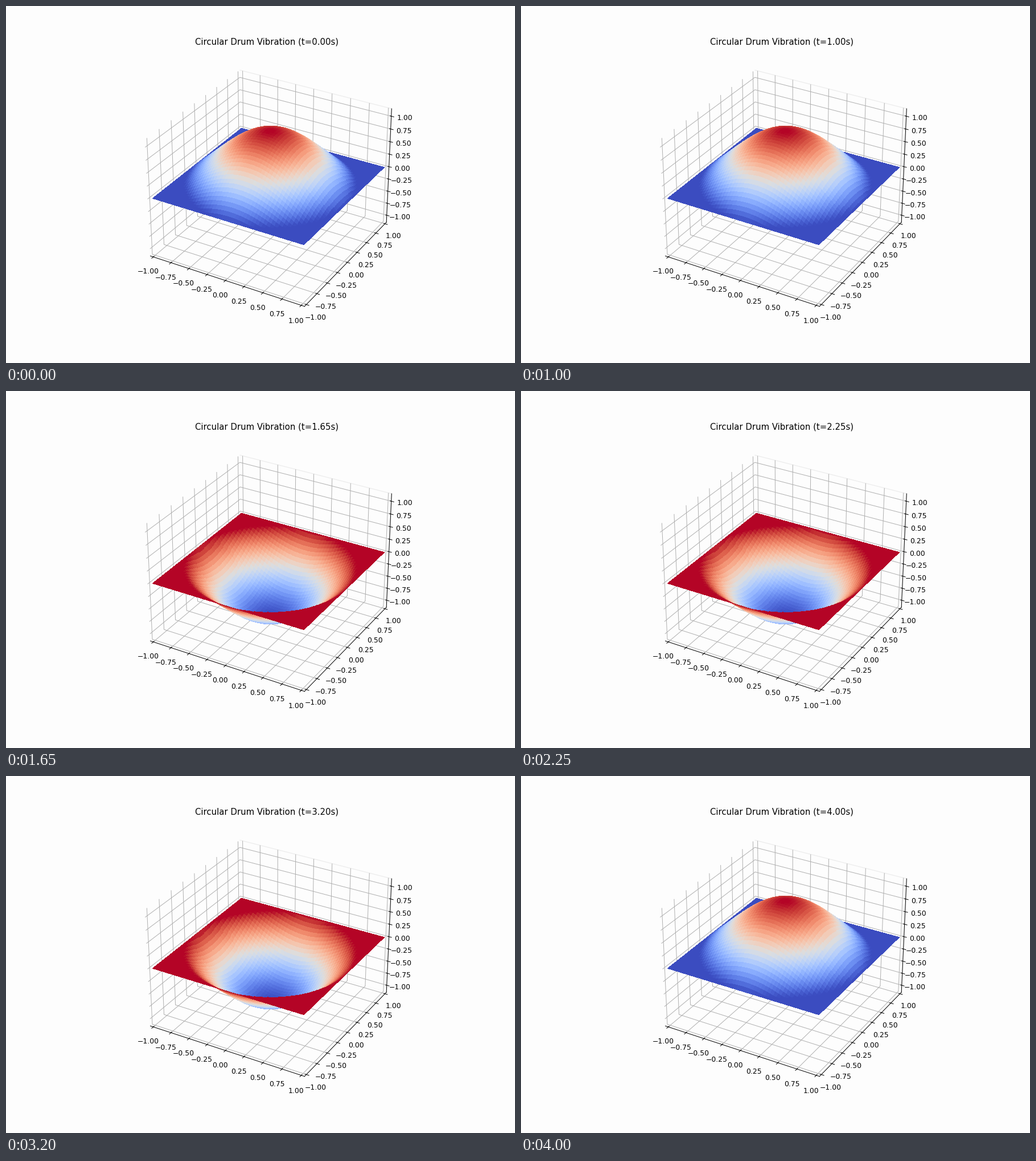
A matplotlib script that plays this animation: 894 by 626 pixels, repeating every 4.05 s.

```python
import math

import numpy as np
import matplotlib.pyplot as plt
from matplotlib.animation import FuncAnimation

WIDTH, HEIGHT, DPI = 894, 626, 89.4
FRAMES, STEP = 81, 0.05          # frame count, seconds per frame
ALPHA, SPEED = 2.4048, 2.0       # first zero of J0, wave speed
PAD = 25 / 24                    # box is slightly larger than the data range
PAPER, RIM = "#fdfdfd", "#ececec"


def bessel0(x):
    """Power series of J0, accurate for small x."""
    return sum((-x * x / 4) ** k / math.factorial(k) ** 2 for k in range(16))


# The small excess keeps float rounding from losing a pixel.
fig = plt.figure(figsize=((WIDTH + 0.01) / DPI, (HEIGHT + 0.01) / DPI),
                 dpi=DPI, facecolor=PAPER)
ax = fig.add_subplot(projection="3d", facecolor=PAPER)

axis = np.linspace(-1, 1, 100)
X, Y = np.meshgrid(axis, axis)
R = np.hypot(X, Y)
mode = np.where(R <= 1, bessel0(ALPHA * R), 0.0)
mode /= np.abs(mode).max()


def surface(z):
    return ax.plot_surface(X, Y, z, cmap="coolwarm", linewidth=0, antialiased=False)


# The shape is normalised, so only the sign of the oscillation shows.
dome, bowl = surface(mode), surface(-mode)

ax.set_xlim(-PAD, PAD)
ax.set_ylim(-PAD, PAD)
ax.set_zlim(-1.1 * PAD, 1.1 * PAD)
for a in (ax.xaxis, ax.yaxis, ax.zaxis):
    a.set_pane_color(PAPER)
ax.yaxis.pane.set_edgecolor(RIM)
title = ax.set_title("")


def update(i):
    t = i * STEP
    up = math.cos(SPEED * ALPHA * t) >= 0
    dome.set_visible(up)
    bowl.set_visible(not up)
    title.set_text(f"Circular Drum Vibration (t={t:.2f}s)")
    return dome, bowl, title


anim = FuncAnimation(fig, update, frames=FRAMES, init_func=lambda: update(0),
                     interval=1000 * STEP, repeat=True, repeat_delay=0, blit=False)
plt.show()
```
